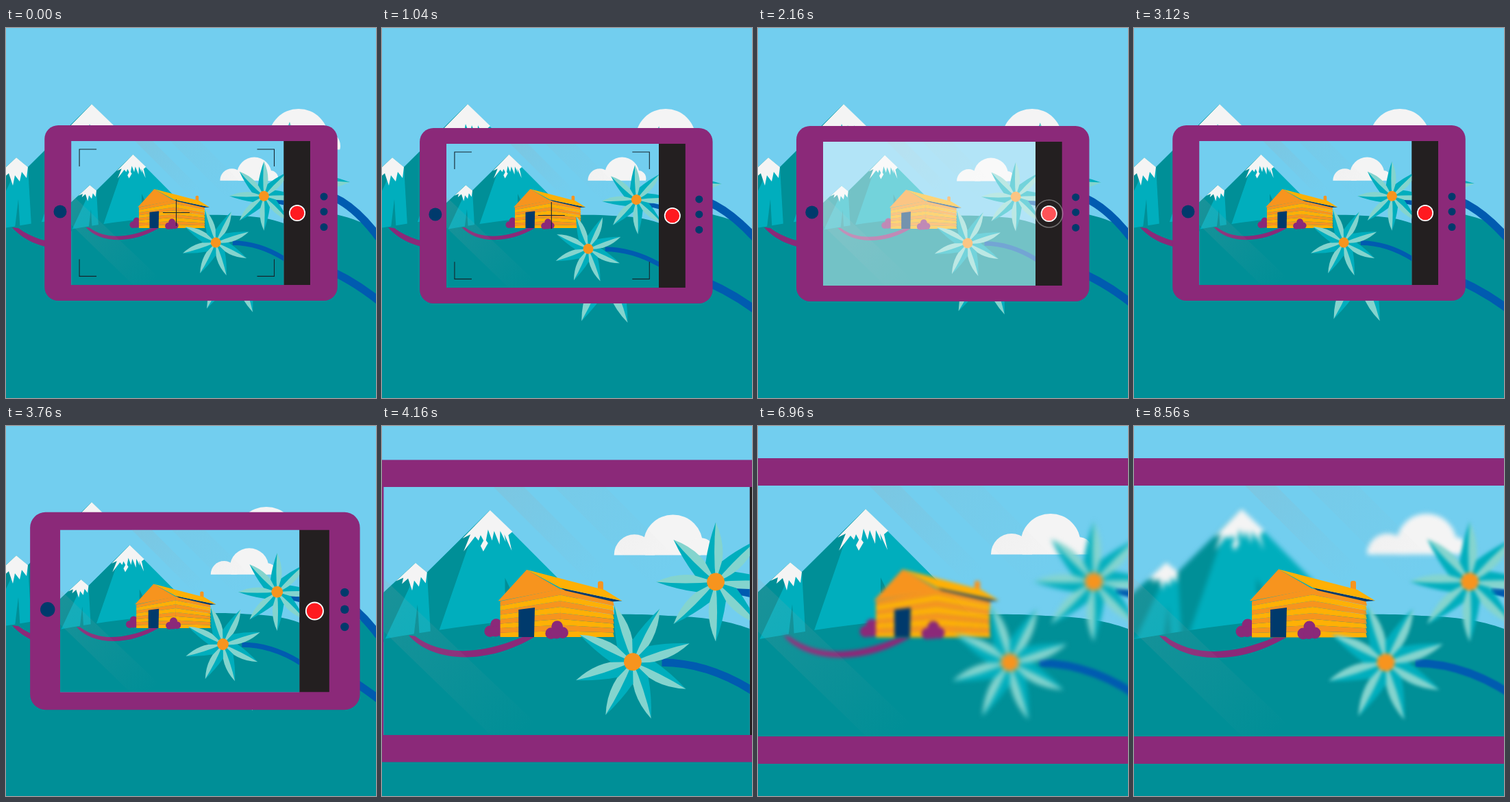
An HTML page with a canvas for the animation above (9520 ms loop, 540 px wide and 540 px high).

```html
<!DOCTYPE html>
<html lang="en">
<head>
<meta charset="utf-8">
<title>Camera focus</title>
<style>
  html, body { margin: 0; width: 100%; height: 100%; overflow: hidden; background: #72ceef; }
  canvas { display: block; width: 100vw; height: 100vh; }
</style>
</head>
<body>
<canvas id="stage" width="540" height="540"></canvas>
<script>
const SIZE = 540, PAD = 30, LOOP = 9520, STEP = 80;
const ZOOM = 1.7425, PHONE_X = 304.5;
const CAPTURE = 1920, FLASH = 480;
const C = {
  sky: '#72ceef', snow: '#f4f4f4', teal: '#00aebd', dark: '#008f97', mint: '#84d4ce',
  purple: '#8b2979', navy: '#003a6c', blue: '#005bb0', orange: '#f7941e', yellow: '#ffb005',
  black: '#231f20', red: '#ff1a20'
};

const main = document.getElementById('stage').getContext('2d');
const buffer = document.createElement('canvas');
buffer.width = buffer.height = SIZE + PAD * 2;
const soft = buffer.getContext('2d');
let g = main;

const clamp = v => Math.min(1, Math.max(0, v));
const smooth = u => u * u * (3 - 2 * u);
const easeCubic = u => u < .5 ? 4 * u ** 3 : 1 - 4 * (1 - u) ** 3;
const mix = (a, b, u) => a + (b - a) * u;

function poly(color, ...p) {
  g.fillStyle = color;
  g.beginPath();
  for (let i = 0; i < p.length; i += 2) g.lineTo(p[i], p[i + 1]);
  g.fill();
}

function dot(color, x, y, r) {
  g.fillStyle = color;
  g.beginPath();
  g.arc(x, y, r, 0, Math.PI * 2);
  g.fill();
}

function shape(color, d) {
  g.fillStyle = color;
  g.fill(new Path2D(d));
}

// Draws a group, through an offscreen buffer when it is out of focus.
function layer(blur, draw) {
  if (blur < .05) return draw();
  const m = main.getTransform();
  soft.setTransform(1, 0, 0, 1, 0, 0);
  soft.clearRect(0, 0, buffer.width, buffer.height);
  soft.setTransform(m.a, m.b, m.c, m.d, m.e + PAD, m.f + PAD);
  g = soft;
  draw();
  g = main;
  g.save();
  g.setTransform(1, 0, 0, 1, 0, 0);
  g.filter = `blur(${blur}px)`;
  g.drawImage(buffer, -PAD, -PAD);
  g.restore();
}

function cloud(dx) {
  g.save();
  g.translate(dx, 0);
  g.beginPath();
  g.rect(330, 110, 170, 77.5);
  g.clip();
  dot(C.snow, 370, 187, 30);
  dot(C.snow, 427, 172, 44);
  dot(C.snow, 468, 182, 20);
  g.restore();
}

function mountains() {
  poly(C.teal, 157, 121, 350, 315, 60, 315, 60, 217);
  poly(C.dark, 157, 121, 60, 217, 60, 315, 78, 310, 128, 165);
  poly(C.dark, 179, 221, 190, 244, 179, 244);
  poly(C.snow, 157, 121, 116, 163, 128, 157, 118, 182, 135, 160, 140, 166, 143, 158, 150, 171,
    154, 150, 160, 166, 163, 152, 171, 172, 172, 152, 180, 168, 178, 157, 189, 181, 184, 158, 190, 153);
  poly(C.snow, 149, 163, 154, 170, 147, 182, 143, 174);

  poly(C.teal, 47, 199, 64, 213, 70, 316, -20, 316, -20, 261);
  poly(C.dark, 47, 199, -20, 261, -20, 316, 0, 316, 38, 235);
  poly(C.dark, 50, 260, 44, 310, 53, 310);
  poly(C.snow, 47, 199, 18, 226, 29, 221, 27, 230, 36, 222, 42, 240, 45, 225,
    52, 234, 55, 220, 62, 229, 64, 213);
}

function hill() {
  shape(C.dark, 'M-60 322 L-20 315 C180 278 330 270 420 277 C490 279 535 288 585 318 L640 350 V640 H-60Z');
}

function path() {
  shape(C.purple, 'M37 306 C70 345 150 352 223 308 L206 308 C140 336 85 336 46 307Z');
}

function bush(x, y) {
  dot(C.purple, x + 1, y - 9, 8.5);
  dot(C.purple, x - 8, y + 1, 8.5);
  dot(C.purple, x + 9, y, 8.5);
  dot(C.purple, x, y + 1, 8);
}

function house() {
  bush(165, 299);
  poly(C.orange, 211, 209, 169, 255, 172, 255, 261, 238);
  const rows = 8;
  for (let i = 0; i < rows; i++) {
    const color = i % 2 ? C.orange : C.yellow;
    const far = k => 308.5 - k * 6.6, near = k => 308.5 - k * 8.9;
    poly(color, 172, far(i), 261, near(i), 261, near(i + 1), 172, far(i + 1));
    poly(color, 260.5, near(i), 340, far(i), 338.5, far(i + 1), 260.5, near(i + 1));
  }
  poly(C.navy, 199, 268, 223, 265, 222, 308.5, 199, 308.5);
  poly(C.navy, 261, 236, 352, 255, 338, 256, 268, 240);
  g.fillStyle = C.orange;
  g.beginPath();
  g.roundRect(316, 226, 8, 18, 3);
  g.fill();
  poly(C.yellow, 211, 209, 326, 239, 352, 255, 261, 236);
  bush(255, 302);
}

function flower(x, y, turn) {
  g.save();
  g.translate(x, y);
  g.rotate(turn);
  for (let i = 0; i < 8; i++) {
    shape(C.teal, 'M0 0 L28 -15 Q58 -11 88 0 Q45 4 0 0Z');
    shape(C.mint, 'M0 0 Q45 -4 88 0 Q42 21 0 0Z');
    g.rotate(Math.PI / 4);
  }
  dot(C.orange, 0, 0, 13);
  g.restore();
}

function stem(x0, y0, cx, cy, x1, y1) {
  g.strokeStyle = C.blue;
  g.lineWidth = 11.5;
  g.beginPath();
  g.moveTo(x0, y0);
  g.quadraticCurveTo(cx, cy, x1, y1);
  g.stroke();
}

// v: cloud shift, flower places and sway, ground shift, blur of each depth
function scene(v) {
  const [far, mid, near] = v.blur, w = v.sway;
  const [ax, ay, amx, amy] = v.upper, [bx, by, bmx, bmy] = v.lower;
  const x1 = ax + amx * w, y1 = ay + amy * w;
  const x2 = bx + bmx * w, y2 = by + bmy * w;

  layer(far, () => { cloud(v.cloud); mountains(); });
  g.save();
  g.translate(...v.ground);
  hill();
  layer(mid, path);
  g.restore();
  layer(mid, house);
  layer(near * .5, () => {
    stem(x1 + 30, y1 + 14, x1 + 80, y1 + 14, ax + 130, ay + 81);
    stem(x2 + 43, y2 + 1, x2 + 145, y2 + 1, bx + bmx * w * .45 + 245, by + bmy * w * .45 + 97);
  });
  layer(near, () => {
    const turn = -.045 * w;
    flower(x1, y1, turn);
    flower(x2, y2, Math.PI * .15 + turn);
  });
}

function swayAt(t) {
  const k = t / 960, u = k % 1;
  const e = (u + smooth(u)) / 2;
  return Math.floor(k) % 2 ? 1 - e : e;
}

function blurAt(t) {
  const poses = [[0, 0, 0], [3.8, 2.5, 0], [0, 2.5, 3.8], [3.6, 0, 2.5]];
  let now = poses[0];
  [4640, 6240, 7840].forEach((start, i) => {
    const u = smooth(clamp((t - start) / 720));
    now = now.map((b, j) => mix(b, poses[i + 1][j], u));
  });
  return now;
}

function outside(t) {
  g.save();
  g.translate(-32, -10);
  scene({
    cloud: 32 - t * .0125, sway: swayAt(Math.min(t, 3840)), ground: [4, -5], blur: [0, 0, 0],
    upper: [446, 235, -6.5, 6.5], lower: [365, 341, -5.5, 17.5]
  });
  g.restore();
}

function picture(t) {
  const live = Math.min(t, CAPTURE);
  g.fillStyle = C.sky;
  g.fillRect(-100, -100, 800, 800);
  scene({
    cloud: (CAPTURE - live) * .02, sway: swayAt(live), ground: [0, 0], blur: blurAt(t),
    upper: [490, 227, -9.5, 9.5], lower: [367.5, 345, -9.5, 17]
  });
}

function toPicture() {
  g.scale(1 / ZOOM, 1 / ZOOM);
  g.translate(-PHONE_X, -270);
}

function glare() {
  const band = (x0, y0, x1, y1, alpha, ...pts) => {
    const fade = g.createLinearGradient(x0, y0, x1, y1);
    fade.addColorStop(0, `rgba(165,165,165,${alpha})`);
    fade.addColorStop(1, 'rgba(165,165,165,0)');
    poly(fade, ...pts);
  };
  band(170, 87, 310, 227, .18, 160, 85, 205, 85, 350, 230, 305, 230);
  band(250, 87, 400, 237, .09, 250, 85, 325, 85, 475, 235, 400, 235);
  band(0, 250, 205, 455, .15, 0, 222, 245, 455, 160, 455, 0, 300);
}

function viewfinder() {
  g.strokeStyle = '#15262e';
  g.lineWidth = 1.1;
  g.beginPath();
  for (const sx of [-1, 1]) for (const sy of [-1, 1]) {
    const x = -20.7 + sx * 142.2, y = -.3 + sy * 92.7;
    g.moveTo(x - sx * 25, y);
    g.lineTo(x, y);
    g.lineTo(x, y - sy * 25);
  }
  g.moveTo(-41, -.5);
  g.lineTo(-2, -.5);
  g.moveTo(-21.5, -20);
  g.lineTo(-21.5, 19);
  g.stroke();
}

function phone(t) {
  const p = easeCubic(clamp((t - 3460) / 860));
  const bob = t < 2560 ? (1 - Math.cos(t / 2560 * Math.PI * 2)) / 2 : 0;
  const scale = mix(1, ZOOM, p);
  const flash = t < CAPTURE ? 0 : clamp(1 - (t - CAPTURE) / FLASH);

  g.save();
  g.translate(mix(270, PHONE_X, p) - 1.3 * bob, 270 + 4.3 * bob);
  g.scale(scale, scale);

  g.fillStyle = C.purple;
  g.beginPath();
  g.roundRect(-213.75, -128, 427.5, 256, 20);
  g.fill();
  dot(C.navy, -191, -2, 9.5);
  for (const y of [-24, -2, 20.5]) dot(C.navy, 194, y, 5.5);
  g.fillStyle = C.black;
  g.fillRect(135, -105, 39, 210);

  g.save();
  g.beginPath();
  g.rect(-174.75, -105, 310, 210);
  g.clip();
  g.save();
  // Until the shot is taken, the view stays still while the phone moves.
  if (t < CAPTURE) g.setTransform(1, 0, 0, 1, 270, 270);
  toPicture();
  picture(t);
  g.restore();
  g.save();
  toPicture();
  glare();
  g.restore();
  if (t < CAPTURE) viewfinder();
  if (flash) {
    g.fillStyle = `rgba(255,255,255,${.9 * flash})`;
    g.fillRect(-180, -110, 330, 220);
  }
  g.restore();

  dot('#fff', 155, 0, 12);
  dot(C.red, 155, 0, 10.3);
  if (flash) {
    dot(`rgba(255,255,255,${.5 * flash})`, 155, 0, 10.3);
    g.strokeStyle = `rgba(190,190,190,${flash})`;
    g.lineWidth = 1.5;
    g.beginPath();
    g.arc(155, 0, 12 + 16 * (1 - flash), 0, Math.PI * 2);
    g.stroke();
  }
  g.restore();
}

function render(t) {
  g.setTransform(1, 0, 0, 1, 0, 0);
  g.fillStyle = C.sky;
  g.fillRect(0, 0, SIZE, SIZE);
  outside(t);
  phone(t);
}

let start = null, shown = -1;
function tick(now) {
  if (start === null) start = now;
  const t = Math.floor((now - start) % LOOP / STEP) * STEP;
  if (t !== shown) render(shown = t);
  requestAnimationFrame(tick);
}
render(0);
requestAnimationFrame(tick);
</script>
</body>
</html>
```
